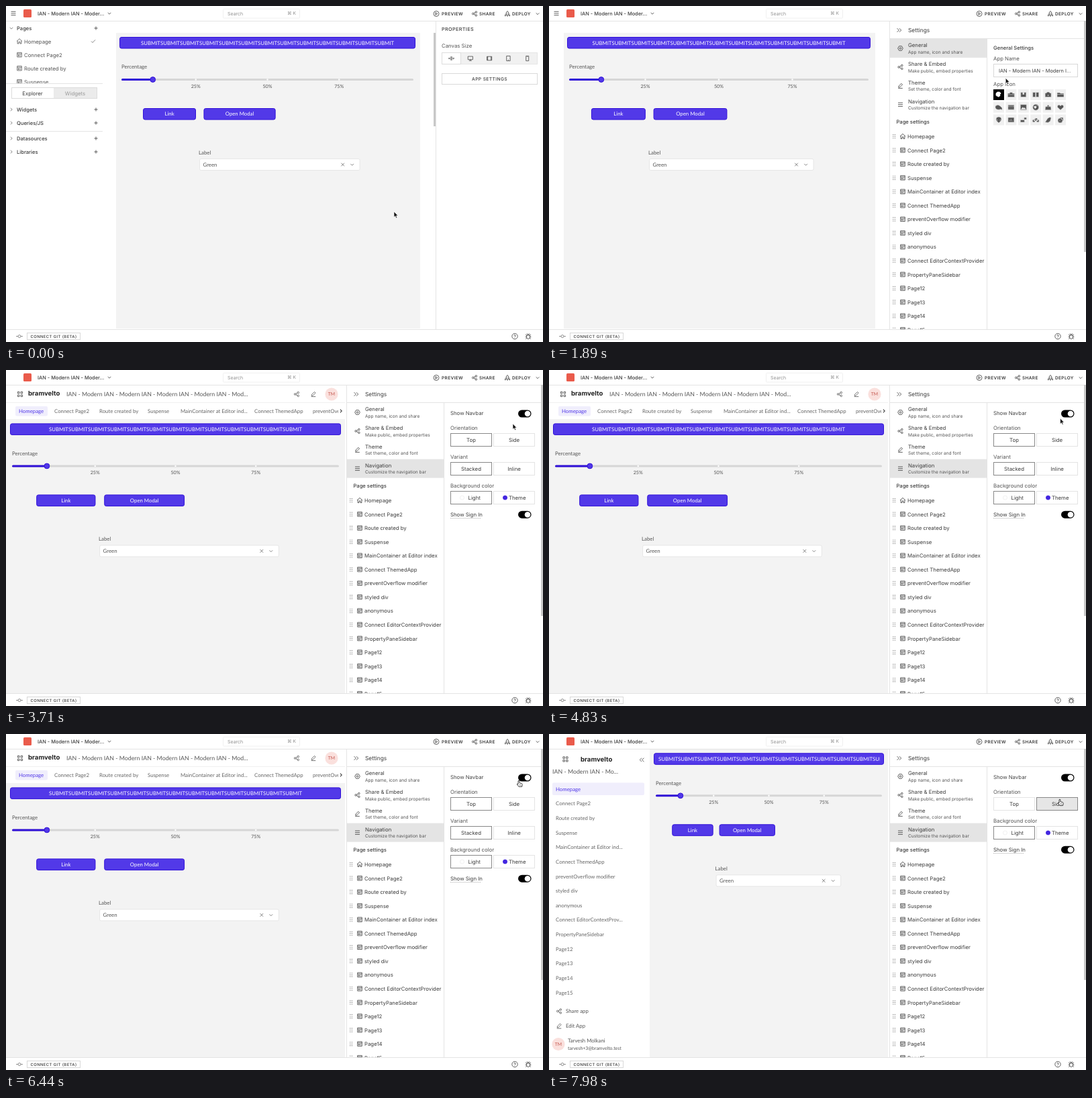
Recreate the animation shown at these times as an HTML page. Size 800 by 500 pixels, loop 8000 ms.

```html
<!DOCTYPE html>
<html lang="en">
<head>
<meta charset="utf-8">
<title>App editor navigation settings</title>
<style>
html, body { margin: 0; width: 100%; height: 100%; overflow: hidden; background: #fff; }
svg { display: block; }
text { font-family: Inter, sans-serif; text-rendering: geometricPrecision; white-space: pre; }
text.app { font-family: Lato, sans-serif; }
</style>
</head>
<body>
<svg id="stage" width="800" height="500" viewBox="0 0 800 500"></svg>
<script>
const stage = document.getElementById('stage');
const LOOP = 8000;
const INK = '#3c3c3c', LINE = '#e4e4e4', ACCENT = '#5239e8', EDGE = '#3010d8', HOVER = '#e4e4e4', BRAND = 'bramvelto';
const TITLE = 'IAN - Modern ';
const PAGES = ['Homepage', 'Connect Page2', 'Route created by', 'Suspense', 'MainContainer at Editor index',
  'Connect ThemedApp', 'preventOverflow modifier', 'styled div', 'anonymous', 'Connect EditorContextProvider',
  'PropertyPaneSidebar', 'Page12', 'Page13', 'Page14', 'Page15'];
const SHORT_PAGES = PAGES.map(name => name.replace('index', 'ind...').replace('Provider', 'Prov...'));

// Drawing helpers; text is placed by its vertical centre.
const text = (x, y, str, { size = 7.8, fill = INK, weight = 400, anchor = 'start', cls = '', gap = 0 } = {}) =>
  `<text x="${x}" y="${y + size * 0.36}" font-size="${size}" fill="${fill}" font-weight="${weight}"
    text-anchor="${anchor}" class="${cls}" letter-spacing="${gap}">${str.replace(/&/g, '&amp;')}</text>`;
const appText = (x, y, str, o = {}) => text(x, y, str, { size: 7.8, fill: '#555', cls: 'app', ...o });
const caps = (x, y, str, o = {}) => text(x, y, str, { size: 6.67, weight: 500, gap: 0.4, ...o });
const rect = (x, y, w, h, fill = 'none', stroke = 'none', r = 0) =>
  `<rect x="${x}" y="${y}" width="${w}" height="${h}" fill="${fill}" stroke="${stroke}" rx="${r}"/>`;
const circle = (x, y, r, fill = 'none', stroke = 'none') =>
  `<circle cx="${x}" cy="${y}" r="${r}" fill="${fill}" stroke="${stroke}"/>`;
const line = (x1, y1, x2, y2, color = LINE) => `<path d="M${x1} ${y1}L${x2} ${y2}" stroke="${color}"/>`;
const clip = (x, y, w, h, body) =>
  `<svg x="${x}" y="${y}" width="${w}" height="${h}" viewBox="${x} ${y} ${w} ${h}">${body}</svg>`;

const ICONS = {
  menu: 'M-3.5-2.7h7M-3.5 0h7M-3.5 2.7h7',
  down: 'M-2.3-1.1L0 1.2 2.3-1.1',
  right: 'M-1.1-2.3L1.2 0-1.1 2.3',
  plus: 'M-2.6 0h5.2M0-2.6v5.2',
  check: 'M-3 0L-1 2 3-2.2',
  cross: 'M-2.3-2.3l4.6 4.6M2.3-2.3l-4.6 4.6',
  home: 'M-4 0L0-3.8 4 0M-2.9-.8v4.3h1.9v-2.6h2v2.6h1.9v-4.3',
  page: 'M-3.3-3.3h6.6v6.6h-6.6zM-3.3-1.4h6.6M-1.8.3h1.3v1.4h-1.3zM.8.3h1.2M.8 1.7h1.2',
  play: 'M-4 0a4 4 0 1 0 8 0a4 4 0 1 0-8 0M-1.2-1.8v3.6L1.9 0z',
  share: 'M-3.6 0a1.3 1.3 0 1 0 2.6 0a1.3 1.3 0 1 0-2.6 0M1-2.4a1.3 1.3 0 1 0 2.6 0a1.3 1.3 0 1 0-2.6 0M1 2.4a1.3 1.3 0 1 0 2.6 0a1.3 1.3 0 1 0-2.6 0M-1.2-.6L1.2-1.8M-1.2.6L1.2 1.8',
  rocket: 'M-1.8 2v-3.6L0-4l1.8 2.4v3.6zM-1.8 0l-1.7 1.7v1.8l1.7-1.2M1.8 0l1.7 1.7v1.8l-1.7-1.2M0-1.2v1M-1 3.6h2',
  commit: 'M-5 0h3M2 0h3M-2 0a2 2 0 1 0 4 0a2 2 0 1 0-4 0',
  help: 'M-4.2 0a4.2 4.2 0 1 0 8.4 0a4.2 4.2 0 1 0-8.4 0M-1.2-1a1.2 1.2 0 1 1 1.2 1.4v.5M0 2v.7',
  bug: 'M-2.4-1.4h4.8v2.9a2.4 2.4 0 0 1-4.8 0zM-1.5-1.6a1.5 1.5 0 0 1 3 0M-4.4.8h2M2.4.8h2M-4-2.7l1.6 1.3M4-2.7l-1.6 1.3M-3.9 4l1.7-1.4M3.9 4l-1.7-1.4M-1-3l-1-1.2M1-3l1-1.2',
  fluid: 'M-.6-3v6M.6-3v6M-4 0h2.5M1.5 0h2.5M-2.8-1.2L-4 0l1.2 1.2M2.8-1.2L4 0 2.8 1.2',
  desktop: 'M-3.6-3h7.2v4.7h-7.2zM0 1.7v1.6M-2 3.3h4',
  tabletWide: 'M-3.6-2.8h7.2v5.6h-7.2zM-2.5-2.8v5.6M2.5-2.8v5.6',
  tablet: 'M-2.7-3.6h5.4v7.2h-5.4zM-.6 2.3h1.2',
  phone: 'M-2-3.6h4v7.2h-4zM-.5-2.5h1',
  forward: 'M-2.9-2.8L-.1 0l-2.8 2.8M.4-2.8L3.2 0 .4 2.8',
  back: 'M-.4-2.8L-3.2 0l2.8 2.8M2.9-2.8L.1 0l2.8 2.8',
  gear: 'M-1.9-3.3h3.8L3.8 0 1.9 3.3h-3.8L-3.8 0zM-1.3 0a1.3 1.3 0 1 0 2.6 0a1.3 1.3 0 1 0-2.6 0',
  pencil: 'M-2.8 2.3l.3-1.9L1.5-3.5l1.6 1.6-4 4zM-3.3 3.6h6.6',
  apps: 'M-3.6-3.6h2.5v2.5h-2.5zM1.1-3.6h2.5v2.5h-2.5zM-3.6 1.1h2.5v2.5h-2.5zM1.1 1.1h2.5v2.5h-2.5z'
};
const icon = (name, x, y, color = INK, width = 0.8) =>
  `<path d="${ICONS[name]}" transform="translate(${x} ${y})" fill="none" stroke="${color}" stroke-width="${width}"/>`;

// Small filled glyphs for the app icon picker.
const GLYPHS = [
  'M-4 2a4 4 0 0 1 7-5l1 1-2 2 1 1-3 3z', 'M-5-2h3v-1.5h4v1.5h3v5.5h-10zM-5 0h10',
  'M-4-3.5h8v7h-8zM-1-3.5v3h2v-3', 'M-4.5-3.5h4v7h-4zM.5-3.5h4v7h-4z',
  'M-4.5-2.5h2l1-1.5h3l1 1.5h2v6h-9zM-1 1h2M0 0v2', 'M-5-3h4l1 1h5v5.5h-10zM-5-.5h10',
  'M-5-2q4-3 7 0l3 3v3l-2-1q-6 2-8-2z', 'M-4.5-3.5h9v7h-9zM-4.5-1.5h9M-2 1h1M1 1h1',
  'M-4.5-4h9v8h-9zM-3.5 3l2.5-3 1.5 1.5 1-1 2 2.5z', 'M-4.5 0a4.5 4.5 0 1 0 9 0a4.5 4.5 0 1 0-9 0M-3-1l3-1 1 2-2 2zM1-3l2 1',
  'M-4-1h8l.5 5h-9zM-2-1q2-5 4 0', 'M0 4l-4.5-4q-.5-4 3-3.5L0-2l1.5-1.5q3.5-.5 3 3.5z',
  'M0 4.5q-4-3-4-5.5a4 3.5 0 0 1 8 0q0 2.5-4 5.5M-3-.5l2 1.5M3-.5l-2 1.5', 'M-4.5-3.5h9v7h-9zM-2 2v-2M0 2v-3M2 2v-1',
  'M-4.5 0h6v3.5h-6zM1-3.5h3.5v3h-3.5zM-2-2h3', 'M-5 1.5a2 2 0 1 0 4 0a2 2 0 1 0-4 0M1 1.5a2 2 0 1 0 4 0a2 2 0 1 0-4 0M-3 1.5l2-4h3l1 4M-1-2.5l2 4',
  'M-4.5 3.5l4-6 3-1.5 2 1-1.5 5-3 2z', 'M-4 1a3 3 0 1 0 7 0a3 3 0 1 0-7 0M-1-3.5h5v5M-1 0v2'
];

function header(showMenu) {
  const action = (name, x, tx, label) => icon(name, x, 11.5) + caps(tx, 11.3, label, { size: 6.45, weight: 600 });
  return line(0, 22.5, 800, 22.5) +
    (showMenu ? icon('menu', 11, 11) : '') +
    rect(26, 5, 12, 12, '#ea5b4b', 'none', 1.5) +
    text(47, 11, TITLE + 'IAN - Moder...', { size: 7.4, weight: 500 }) + icon('down', 154, 11) +
    rect(323.5, 4.5, 114, 13.5, '#fff', '#f0f0f0', 1) +
    text(330, 11, 'Search', { size: 7, fill: '#909090' }) + text(419, 11, '⌘ K', { size: 6.6, fill: '#909090' }) +
    action('play', 641, 649, 'PREVIEW') + action('share', 698, 705, 'SHARE') +
    action('rocket', 747, 754, 'DEPLOY') + icon('down', 792, 11.5);
}

function footer() {
  return rect(0, 481, 800, 19, '#fff') + line(0, 481.5, 800, 481.5) + icon('commit', 20, 491.5, '#777') +
    rect(31.5, 486.5, 79, 10, '#fff', '#d8d8d8') + caps(36.5, 491.5, 'CONNECT GIT (BETA)', { size: 5.9 }) +
    icon('help', 758, 491.5) + icon('bug', 778, 491.5);
}

// The edited app; every widget scales with the width of the canvas.
function canvas(bg, x, y, w) {
  const button = (bx, by, bw, label) => rect(bx + .5, by + .5, bw - 1, 16.5, ACCENT, EDGE, 2.5) +
    (label ? appText(bx + bw / 2, by + 8.5, label, { fill: '#fff', anchor: 'middle' }) : '');
  const submit = 'SUBMIT'.repeat(13), fits = w > 400;
  const start = x + 3, track = w - 6, mark = f => start + 4 + (track - 8) * f, ty = y + 63.5;
  const sx = x + w * .27, sw = w * .541, right = sx + sw;
  return rect(...bg, '#f3f3f3') +
    button(x, y, w) +
    clip(x + 7, y, w - 13, 17, appText(fits ? x + w / 2 : x + 7, y + 8.7, submit,
      { fill: '#fff', anchor: fits ? 'middle' : 'start' })) +
    appText(start, y + 44.5, 'Percentage') +
    rect(start, ty - 1.5, track, 3, '#d6d6d6', 'none', 1.5) + rect(start, ty - 1.5, mark(.1) - start, 3, EDGE, 'none', 1.5) +
    [25, 50, 75].map(p => circle(mark(p / 100), ty, 1.2, '#fff') +
      appText(mark(p / 100), y + 73, p + '%', { size: 7.2, anchor: 'middle' })).join('') +
    circle(mark(.1), ty, 3.9, ACCENT, EDGE) +
    button(x + w * .0795, y + 106, w * .179, 'Link') + button(x + w * .2845, y + 106, w * .243, 'Open Modal') +
    appText(sx - 1, y + 172, 'Label') + rect(sx + .5, y + 181.5, sw, 17, '#fff', '#e6e6e6', 2) +
    appText(sx + 5.5, y + 190, 'Green') +
    icon('cross', right - 25, y + 190, '#666') + icon('down', right - 11, y + 190, '#666');
}

function explorer() {
  const section = (y, name, arrow) => icon(arrow, 8, y, '#666') + text(16, y, name, { weight: 500, size: 7.6 }) + icon('plus', 134, y);
  return section(33, 'Pages', 'down') + icon('check', 130, 52.5, '#666') +
    clip(0, 42, 144, 73, PAGES.slice(0, 4).map((name, i) =>
      icon(i ? 'page' : 'home', 20, 52.5 + i * 20.1, '#555') + text(27, 52.7 + i * 20.1, name, { fill: '#555' })).join('')) +
    line(0, 115.5, 144, 115.5) +
    rect(8.5, 121.5, 127, 16, '#ebebeb', '#dcdcdc') + rect(9, 122, 62, 15, '#fff') +
    text(39.5, 129.7, 'Explorer', { anchor: 'middle' }) + text(103, 129.7, 'Widgets', { anchor: 'middle', fill: '#999' }) +
    section(154, 'Widgets', 'right') + section(174, 'Queries/JS', 'right') + line(0, 186.5, 144, 186.5) +
    section(197, 'Datasources', 'right') + section(217, 'Libraries', 'right');
}

function properties(hover, tooltip) {
  const sizes = ['fluid', 'desktop', 'tabletWide', 'tablet', 'phone'];
  return rect(637, 40, 3, 139, '#c8c8c8') + line(640.5, 23, 640.5, 481) +
    caps(649, 34.5, 'PROPERTIES', { size: 7.2 }) + text(649, 59, 'Canvas Size', { fill: '#555' }) +
    rect(649.5, 69.5, 142, 17, '#f1f1f1', '#e6e6e6') + rect(649.5, 69.5, 28, 17, '#fff', '#ddd') +
    sizes.map((name, i) => icon(name, 663.5 + i * 28.3, 78, '#444')).join('') +
    rect(649.5, 100.5, 142, 16, hover ? '#ececec' : '#fff', hover ? '#888' : '#dadada') +
    caps(720.5, 108.5, 'APP SETTINGS', { anchor: 'middle' }) +
    (tooltip ? rect(661, 124, 118, 34, '#000') + '<path d="M714.5 124.5l6-5.5 6 5.5z"/>' +
      ['Update your app theme, URL', 'and other settings'].map((s, i) =>
        text(720, 135.3 + i * 11.6, s, { size: 7.4, fill: '#fff', anchor: 'middle' })).join('') : '');
}

function settings(active, hover) {
  const items = [['gear', 'General', 'App name, icon and share'], ['share', 'Share & Embed', 'Make public, embed properties'],
    ['pencil', 'Theme', 'Set theme, color and font'], ['menu', 'Navigation', 'Customize the navigation bar']];
  return rect(507, 23, 293, 458, '#fff') + line(507.5, 23, 507.5, 481) +
    icon('forward', 521.5, 36) + text(535, 36, 'Settings', { size: 8.4 }) + line(508, 48.5, 800, 48.5) +
    items.map(([name, title, note], i) => {
      const y = 49 + i * 27.9;
      return (i === active || i === hover ? rect(508, y, 144, 27.9, HOVER) : '') + icon(name, 523.5, y + 14) +
        text(535, y + 9.5, title) + text(535, y + 19.3, note, { size: 6.6, fill: '#555' });
    }).join('') +
    text(517.5, 172.5, 'Page settings', { weight: 500, size: 7.6 }) +
    PAGES.map((name, i) => {
      const y = 194 + i * 20.55;
      const dots = [0, 1, 2, 3, 4, 5].map(k => circle(512.8 + k % 2 * 2.6, y - 2.6 + (k >> 1) * 2.6, .65, '#777')).join('');
      return dots + icon(i ? 'page' : 'home', 527, y) + text(534, y + .2, name);
    }).join('') +
    line(652.5, 49, 652.5, 481) + rect(797, 22, 3, 344, '#c8c8c8');
}

function generalPane() {
  return text(662, 62, 'General Settings', { weight: 500, size: 7.6 }) + text(662, 78, 'App Name', { fill: '#555' }) +
    rect(662.5, 86.5, 125, 19, '#fff', '#d8d8d8') + text(670, 96.3, TITLE + TITLE + 'I...', { size: 7.4 }) +
    text(662, 116.5, 'App Icon', { fill: '#555' }) +
    GLYPHS.map((d, i) => {
      const x = 670 + i % 6 * 18.4, y = 132 + Math.floor(i / 6) * 18.7, [bg, ink] = i ? ['#f0f0f0', '#555'] : ['#000', '#fff'];
      return rect(x - 8, y - 8, 16, 16, bg) +
        `<path d="${d}" transform="translate(${x} ${y})" fill="${ink}" stroke="${i ? '#ddd' : '#000'}" stroke-width=".6" fill-rule="evenodd"/>`;
    }).join('');
}

function navigationPane({ navbar, side, hoverSide }) {
  const toggle = (y, on) => rect(763, y - 5.5, 19.5, 11, on ? '#000' : '#a3abb1', 'none', 5.5) +
    circle(on ? 777 : 768.5, y, 4.3, '#fff');
  const choice = (x, y, label, on, { hover, dot } = {}) =>
    rect(x + .5, y + .5, 61, 19, hover ? '#e6e6e6' : '#fff', on ? '#888' : '#e4e4e4') +
    (dot ? circle(x + 17.5, y + 10, 3, dot, dot === '#fff' ? '#f0f0f0' : dot) : '') +
    text(x + (dot ? 35.7 : 31), y + 10.3, label, { anchor: 'middle' });
  let out = text(662, 64.5, 'Show Navbar', { fill: '#444' }) + toggle(65, navbar);
  if (!navbar) return out;
  out += text(662, 86.5, 'Orientation', { fill: '#555' }) + choice(662, 94, 'Top', !side) +
    choice(726, 94, 'Side', side, { hover: hoverSide });
  if (!side) out += text(662, 129.2, 'Variant', { fill: '#555' }) + choice(662, 137, 'Stacked', true) + choice(726, 137, 'Inline', false);
  const y = side ? 129 : 172;
  return out + text(662, y, 'Background color', { fill: '#555' }) +
    choice(662, y + 8, 'Light', true, { dot: '#fff' }) + choice(726, y + 8, 'Theme', false, { dot: '#4326e0' }) +
    text(662, y + 43, 'Show Sign In') +
    `<path d="M662 ${y + 48.5}h46" stroke="#888" stroke-width=".7" stroke-dasharray="1 1"/>` + toggle(y + 43.2, true);
}

const avatar = (x, y) => circle(x, y, 9.6, '#fae0dd') + appText(x, y, 'TM', { size: 6.8, fill: '#c4574f', anchor: 'middle' });
const brand = (x, y) => text(x, y, BRAND, { size: 9.6, weight: 700, fill: '#222' });

function topNav() {
  const starts = [19, 72, 139, 211, 260, 370, 457];
  return rect(0, 23, 505, 50, '#fff') + icon('apps', 21, 36) + brand(33, 35) +
    appText(90, 36, TITLE.repeat(4) + 'IAN - Mod...', { size: 8.8 }) +
    icon('share', 433, 36, '#555') + icon('pencil', 458, 36, '#555') + avatar(485, 36) +
    line(0, 48.5, 505, 48.5, '#f0f0f0') + rect(14, 54, 48, 14.5, '#f0eefc', 'none', 2) +
    clip(0, 50, 495, 22, starts.map((x, i) => appText(x, 61.2, SHORT_PAGES[i], { fill: i ? '#666' : ACCENT })).join('')) +
    icon('right', 499, 61, '#444', 1.1);
}

function sideNav() {
  return rect(0, 23, 150, 458, '#fff') + icon('apps', 24.5, 37.5) + brand(47, 37.5) + icon('back', 138.5, 38.5) +
    appText(5, 56, TITLE + 'IAN - Mo...', { size: 8.8 }) + rect(5, 72.5, 137, 18.5, '#f0eefc', 'none', 2) +
    SHORT_PAGES.map((name, i) => appText(10, 82 + i * 21.63, name, { fill: i ? '#666' : ACCENT })).join('') +
    icon('share', 15, 412.5, '#555') + appText(25, 412.5, 'Share app') +
    icon('pencil', 15, 434.5, '#555') + appText(25, 434.5, 'Edit App') +
    avatar(14, 461.5) + appText(28, 456.5, 'Tarvesh Molkani') + appText(28, 467.3, 'tarvesh+3@bramvelto.test', { size: 6.9 });
}

// Pointer tip over time: [ms, x, y].
const TRACK = [[0, 578, 306], [350, 578, 306], [1350, 681, 107], [1850, 681, 107], [2700, 570, 145], [3010, 570, 145],
  [3550, 755, 80], [4600, 755, 80], [4950, 764, 69], [6500, 764, 69], [6900, 761, 97], [LOOP, 761, 97]];
const CLICKS = [1480, 2790, 5130, 6180, 7260];

function pointerAt(t) {
  const i = TRACK.findIndex(k => k[0] > t), [t0, x0, y0] = TRACK[i - 1], [t1, x1, y1] = TRACK[i];
  const u = (t - t0) / (t1 - t0), e = u * u * (3 - 2 * u);
  return [x0 + (x1 - x0) * e, y0 + (y1 - y0) * e];
}

function pointer(x, y, hand) {
  const shape = hand
    ? '<path d="M-1 .8q1-1.5 1.9 0v3l3.5.9q1 .5.8 1.7l-.6 3h-4.7l-2.6-3.6q0-1.3 1.7-.2z" fill="#fff" stroke="#111" stroke-width=".8"/><path d="M1.2 6v2M2.9 6.2v1.8" stroke="#111" stroke-width=".5"/>'
    : '<path d="M0 0v8.2l1.9-1.7 1.3 2.9 1.4-.6-1.3-2.8h2.5z" fill="#111" stroke="#fff" stroke-width=".6"/>';
  return `<g transform="translate(${x} ${y})">${shape}</g>`;
}

function scene(t) {
  const [x, y] = pointerAt(t);
  const over = (x0, y0, x1, y1) => x >= x0 && x <= x1 && y >= y0 && y <= y1;
  const editing = t < 1750, general = !editing && t < 3010;
  const navbar = t < 5200 || t >= 6250, side = t >= 7450;
  let out = header(t < 3010), hand;

  if (editing) {
    hand = over(649, 100, 792, 117);
    out += explorer() + canvas([164, 40, 453, 440], 169, 46, 441) + properties(hand, t > 1450);
  } else {
    const row = over(508, 49, 652, 161) ? Math.floor((y - 49) / 27.9) : -1;
    const hoverSide = over(726, 94, 788, 114);
    hand = row >= 0 || (!general && (hoverSide || over(762, 59, 783, 71)));
    out += general ? canvas([22, 40, 464, 440], 27, 46, 452)
      : side ? canvas([150, 23, 355, 458], 156, 28.3, 343) + sideNav()
      : navbar ? canvas([0, 73, 505, 408], 6, 79.4, 493) + topNav()
      : canvas([0, 23, 505, 458], 6, 28.3, 493);
    out += settings(general ? 0 : 3, row) + (general ? generalPane() : navigationPane({ navbar, side, hoverSide }));
  }
  out += footer();
  if (t >= 5250 && t < 6000) out += '<path d="M0 489h264q2 0 2 2v9h-266z" fill="#4b4b4b"/>' +
    text(3, 494.7, 'Establishing secure connection...', { size: 6.4, weight: 600, fill: '#fff' });
  if (CLICKS.some(c => t >= c && t < c + 220))
    out += `<circle cx="${x}" cy="${y}" r="15.5" fill="#6d94dc" fill-opacity=".08" stroke="#7f9fdc" stroke-width="1.3"/>`;
  return out + pointer(x, y, hand);
}

let shown = '';
function frame(now) {
  const markup = scene(now % LOOP);
  if (markup !== shown) stage.innerHTML = shown = markup;
  requestAnimationFrame(frame);
}
frame(0);
</script>
</body>
</html>
```
